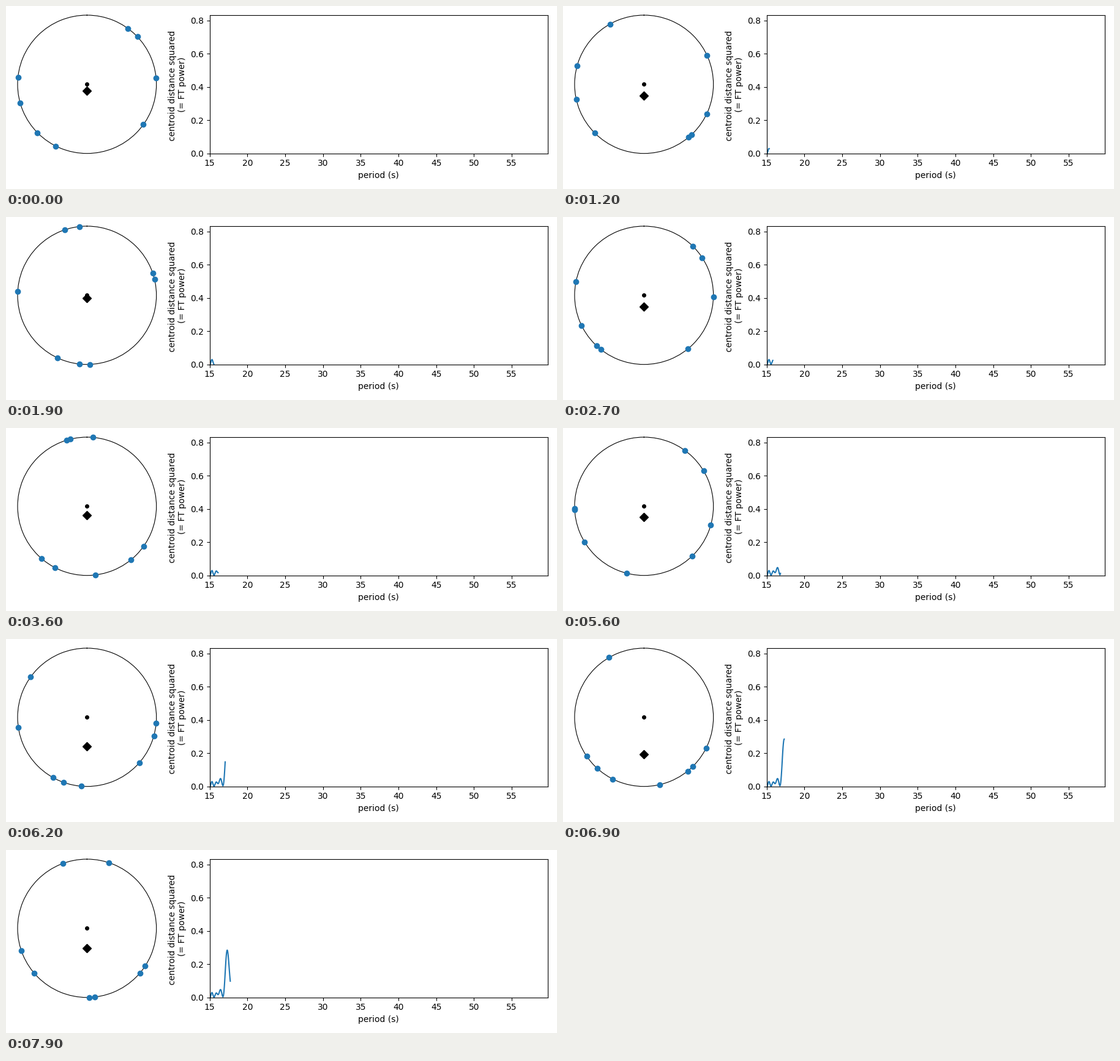
Recreate the animation shown at these times as a matplotlib script. Size 900 by 300 pixels, loop 8000 ms.

```python
import numpy as np
import matplotlib.pyplot as plt
from matplotlib.animation import FuncAnimation

W, H, DPI = 900, 300, 100
FRAMES, INTERVAL = 80, 100
TOP, BOTTOM = 285, 58.3

# Event times in seconds, folded at a slowly growing trial period
times = np.array([0, 116.70, 187.54, 225.43, 261.33, 268.41, 308.32, 380.44])
freqs = np.arange(1 / 15, 1 / 60, -1 / (20 * np.ptp(times)))
periods = 1 / freqs
phases = 2 * np.pi * np.outer(freqs, times)
centroids = np.exp(1j * phases).mean(axis=1)
radius = np.abs(centroids)
power = radius ** 2

fig = plt.figure(figsize=(W / DPI, H / DPI), dpi=DPI, facecolor="white")


def add_axes(left, right, **kwargs):
    box = [left / W, BOTTOM / H, (right - left) / W, (TOP - BOTTOM) / H]
    return fig.add_axes(box, **kwargs)


wheel = add_axes(15, 249.6, projection="polar")
wheel.set_theta_zero_location("N")
wheel.plot(0, 0, "k.", ms=8)
dots, = wheel.plot([], [], "o", color="C0", clip_on=False, zorder=3)
diamond, = wheel.plot([], [], "kD", ms=7, zorder=3)
wheel.set(ylim=(0, 1), xticks=[], yticks=[])

chart = add_axes(332.7, 885)
chart.set(xlim=(periods[0], periods[-1]), ylim=(0, 0.833),
          xticks=range(15, 60, 5), yticks=[0, 0.2, 0.4, 0.6, 0.8],
          xlabel="period (s)",
          ylabel="centroid distance squared \n(= FT power)")
curve, = chart.plot([], [], color="C0", lw=1.5)


def update(k):
    # Turn the wheel so that the centroid always hangs straight down
    dots.set_data(phases[k] - np.angle(centroids[k]) + np.pi,
                  np.ones_like(times))
    diamond.set_data([np.pi], [radius[k]])
    curve.set_data(periods[:k], power[:k])
    return dots, diamond, curve


anim = FuncAnimation(fig, update, frames=FRAMES, interval=INTERVAL,
                     repeat=True, repeat_delay=0)
plt.show()
```
